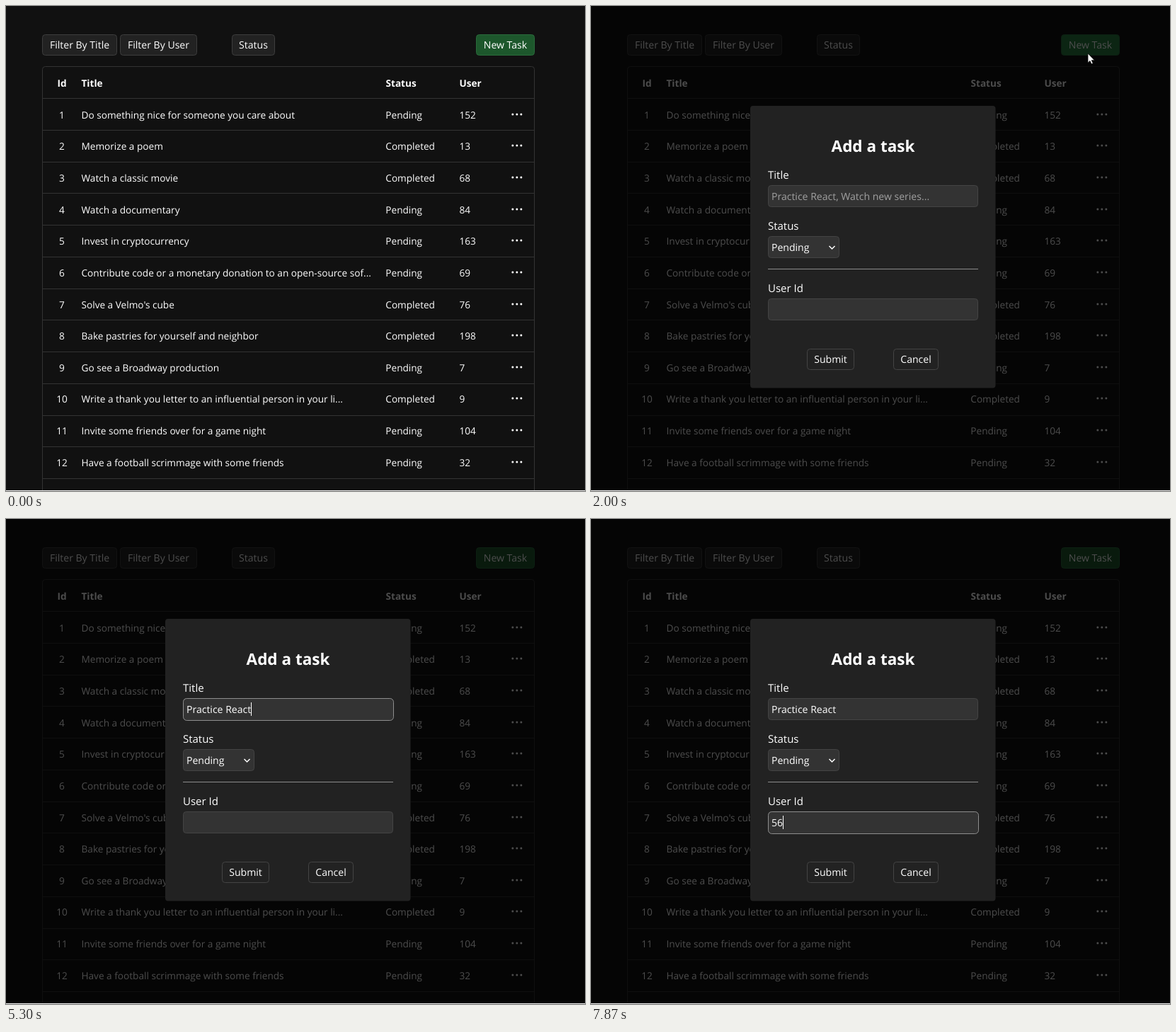
These frames come from a looping animation (818 by 685 pixels, 8 s). An HTML page:

```html
<!DOCTYPE html>
<html lang="en">
<head>
<meta charset="utf-8">
<title>Task list</title>
<style>
  html, body { margin: 0; width: 100%; height: 100%; overflow: hidden; background: #111; }
  svg { display: block; }
  text { font-family: "Open Sans", "Noto Sans", sans-serif; fill: #fff; text-rendering: geometricPrecision; white-space: pre; }
  .cell { font-size: 13.62px; }
  .head { font-size: 13.6px; font-weight: 700; }
  .button, .field { font-size: 14.05px; }
  .label { font-size: 15px; }
  .heading { font-size: 22.5px; font-weight: 700; }
  .option { font-size: 11.3px; }
  .hint { fill: #a0a0a0; }
  .mid { text-anchor: middle; }
</style>
</head>
<body>
<svg id="stage" width="818" height="685" viewBox="0 0 818 685"></svg>
<script>
const LOOP = 8000;
const stage = document.getElementById('stage');

function add(parent, tag, attrs, content) {
  const el = document.createElementNS('http://www.w3.org/2000/svg', tag);
  for (const key in attrs) el.setAttribute(key, attrs[key]);
  if (content) el.textContent = content;
  parent.appendChild(el);
  return el;
}
const group = parent => add(parent, 'g', {});
const text = (parent, x, y, cls, content) => add(parent, 'text', { x, y, class: cls }, content);
const fill = (parent, x, y, width, height, color) =>
  add(parent, 'rect', { x, y, width, height, fill: color });
const box = (parent, x, y, w, h, color, stroke, rx = 4) =>
  add(parent, 'rect', { x: x + .5, y: y + .5, width: w - 1, height: h - 1, rx, fill: color, stroke });

function button(parent, x, y, w, label, color = '#222', stroke = '#3d3d3d') {
  const el = box(parent, x, y, w, 30, color, stroke);
  text(parent, x + w / 2, y + 20, 'button mid', label);
  return el;
}

// Task list
const tasks = [
  ['Do something nice for someone you care about', 0, 152],
  ['Memorize a poem', 1, 13],
  ['Watch a classic movie', 1, 68],
  ['Watch a documentary', 0, 84],
  ['Invest in cryptocurrency', 0, 163],
  ['Contribute code or a monetary donation to an open-source sof...', 0, 69],
  ["Solve a Velmo's cube", 1, 76],
  ['Bake pastries for yourself and neighbor', 1, 198],
  ['Go see a Broadway production', 0, 7],
  ['Write a thank you letter to an influential person in your li...', 1, 9],
  ['Invite some friends over for a game night', 0, 104],
  ['Have a football scrimmage with some friends', 0, 32]
];
fill(stage, 0, 0, 818, 685, '#111');
const page = group(stage);
button(page, 51, 40, 106, 'Filter By Title');
button(page, 161, 40, 109, 'Filter By User');
button(page, 319, 40, 61, 'Status');
const newTask = button(page, 664, 40, 83, 'New Task', '#1d572c', '#2a6b3b');

box(page, 51, 85, 696, 640, 'none', '#333');
text(page, 79, 114, 'head mid', 'Id');
[[107, 'Title'], [537, 'Status'], [641, 'User']].forEach(([x, s]) => text(page, x - .5, 114, 'head', s));
for (let i = 0; i <= tasks.length; i++) {
  fill(page, 52, Math.round(130.2 + 44.75 * i), 694, 1, '#333');
  if (i === tasks.length) break;
  const [title, done, user] = tasks[i];
  const y = Math.floor(159.1 + 44.65 * i);
  text(page, 79, y, 'cell mid', String(i + 1));
  text(page, 106.5, y, 'cell', title);
  text(page, 536.3, y, 'cell', done ? 'Completed' : 'Pending');
  text(page, 640.5, y, 'cell', String(user));
  for (let k = 0; k < 3; k++) add(page, 'circle', { cx: 715.8 + 6 * k, cy: y - 6, r: 1.5, fill: '#fff' });
}

// Dialog
const dialog = group(stage);
fill(dialog, 0, 0, 818, 685, 'rgba(0,0,0,.7)');
add(dialog, 'rect', { x: 225, y: 141, width: 346.5, height: 398.5, rx: 4, fill: '#222' });
text(dialog, 398.5, 206, 'heading mid', 'Add a task');
text(dialog, 250, 244, 'label', 'Title');
text(dialog, 250, 316, 'label', 'Status');
text(dialog, 250, 404, 'label', 'User Id');
box(dialog, 250, 325, 101, 31, '#333', '#444');
text(dialog, 255, 346, 'field', 'Pending');
add(dialog, 'path', { d: 'M336.5 339l4 4 4-4', fill: 'none', stroke: '#fff', 'stroke-width': 1.5 });
fill(dialog, 250, 371, 297, 1, '#8c8c8c');
button(dialog, 305, 484, 67, 'Submit', '#222', '#444');
button(dialog, 427, 484, 64, 'Cancel', '#222', '#444');

function makeField(y) {
  box(dialog, 250, y, 297, 31, '#333', '#444');
  const ring = box(dialog, 250, y, 298, 32, '#333', '#8e8e8e', 5);
  const value = text(dialog, 255, y + 21, 'field', '');
  const caret = fill(dialog, 256, y + 6, 1, 19, '#fff');
  return { ring, value, caret };
}
const titleField = makeField(253);
const userField = makeField(413);
const hint = text(dialog, 255, 274, 'field hint', 'Practice React, Watch new series...');

const list = group(dialog);
const option = box(list, 250, 283, 296, 21, '#2b2a33', '#85848e');
text(list, 255, 299, 'option', 'Practice React');

fill(stage, 0, 684, 818, 1, '#f3f3f3');

// Pointer
const pointer = group(stage);
const press = add(pointer, 'circle', { cx: -1, cy: -.5, r: 12, fill: 'rgba(255,250,15,.56)' });
const outline = { fill: '#fff', stroke: '#111', 'stroke-width': .8, 'stroke-linejoin': 'round' };
const shapes = {
  arrow: add(pointer, 'path', { d: 'M0 0V13.2L3 10.5 5 15 7.2 14 5.2 9.7H9.3Z', ...outline }),
  hand: add(pointer, 'path', {
    d: 'M-1.5 1a1.5 1.5 0 0 1 3 0V6L6 7.2q1.6.6 1.4 2.4L6.2 14V17H-1V14.5L-5.5 9.8q-.4-2 1.8-1.4L-1.5 10Z', ...outline
  }),
  beam: add(pointer, 'path', { d: 'M-3-6.5H-.8L0-6 .8-6.5H3M0-6V6M-3 6.5H-.8L0 6 .8 6.5H3', fill: 'none', stroke: '#c4c4b4' })
};

const easeOut = p => 1 - (1 - p) * (1 - p);
const easeBoth = p => p * p * (3 - 2 * p);
// start, end, steps, ease, from, to
const moves = [
  [530, 1290, 12, easeBoth, [799, 676], [83, 96]],
  [1360, 1430, 2, easeOut, [70, 80], [60, 65]],
  [1500, 1790, 5, easeBoth, [120, 62], [702, 66.5]],
  [2000, 2760, 12, easeBoth, [702, 67], [506, 256]],
  [6170, 6850, 11, easeOut, [506, 262], [470, 417.5]]
];
const titleSteps = [[0, ''], [3900, 'P'], [4070, 'Pr'], [4170, 'Pra'], [4320, 'Prac'], [5300, 'Practice React']];
const userSteps = [[0, ''], [7670, '5'], [7870, '56']];
const titleCaret = [[2970, 3700], [3900, 4830], [5300, 5840], [6380, 6920]];
const userCaret = [[6920, 7600], [7670, 8000]];
const presses = [[1790, 2000], [2830, 3100], [6850, 7050]];
const shown = [[530, 3900], [6170, 7670]];

const during = (spans, t) => spans.some(([a, b]) => t >= a && t < b);
const latest = (steps, t) => steps.filter(s => s[0] <= t).pop();
const show = (el, on) => el.setAttribute('visibility', on ? 'inherit' : 'hidden');

function pointerAt(t) {
  const [start, end, steps, ease, from, to] = latest(moves, t) || moves[0];
  const p = Math.max(0, Math.min(1, (t - start) / (end - start)));
  const q = ease(Math.floor(p * (steps - 1) + .05) / (steps - 1));
  return from.map((v, i) => v + (to[i] - v) * q);
}

function pointerShape(x, y, open) {
  const inside = (l, t, r, b) => x >= l && x <= r && y >= t && y <= b;
  if (open) return inside(250, 253, 547, 284) || inside(250, 413, 547, 444) ? 'beam' : 'arrow';
  const overButton = inside(51, 40, 157, 70) || inside(161, 40, 270, 70) ||
    inside(319, 40, 380, 70) || inside(664, 40, 747, 70);
  return overButton ? 'hand' : 'arrow';
}

function setField(field, steps, carets, focused, t) {
  const value = latest(steps, t)[1];
  if (field.value.textContent !== value) field.value.textContent = value;
  const end = value ? Math.round(255 + field.value.getComputedTextLength()) : 256;
  field.caret.setAttribute('x', end);
  show(field.caret, during(carets, t));
  show(field.ring, focused);
}

function draw(t) {
  const open = t >= 2000;
  show(dialog, open);
  newTask.setAttribute('fill', t >= 1720 && t < 2070 ? '#277d41' : '#1d572c');

  setField(titleField, titleSteps, titleCaret, t >= 2970 && t < 6920, t);
  setField(userField, userSteps, userCaret, t >= 6920, t);
  show(hint, open && t < 3900);
  show(list, t >= 3900 && t < 5300);
  option.setAttribute('fill', t >= 5030 ? '#4a4953' : '#2b2a33');

  const [x, y] = pointerAt(t);
  const shape = pointerShape(x, y, open);
  pointer.setAttribute('transform', `translate(${x.toFixed(1)} ${y.toFixed(1)})`);
  show(pointer, during(shown, t));
  show(press, during(presses, t));
  for (const name in shapes) show(shapes[name], name === shape);
}

const begin = performance.now();
function tick() {
  draw((performance.now() - begin) % LOOP);
  requestAnimationFrame(tick);
}
tick();
</script>
</body>
</html>
```
